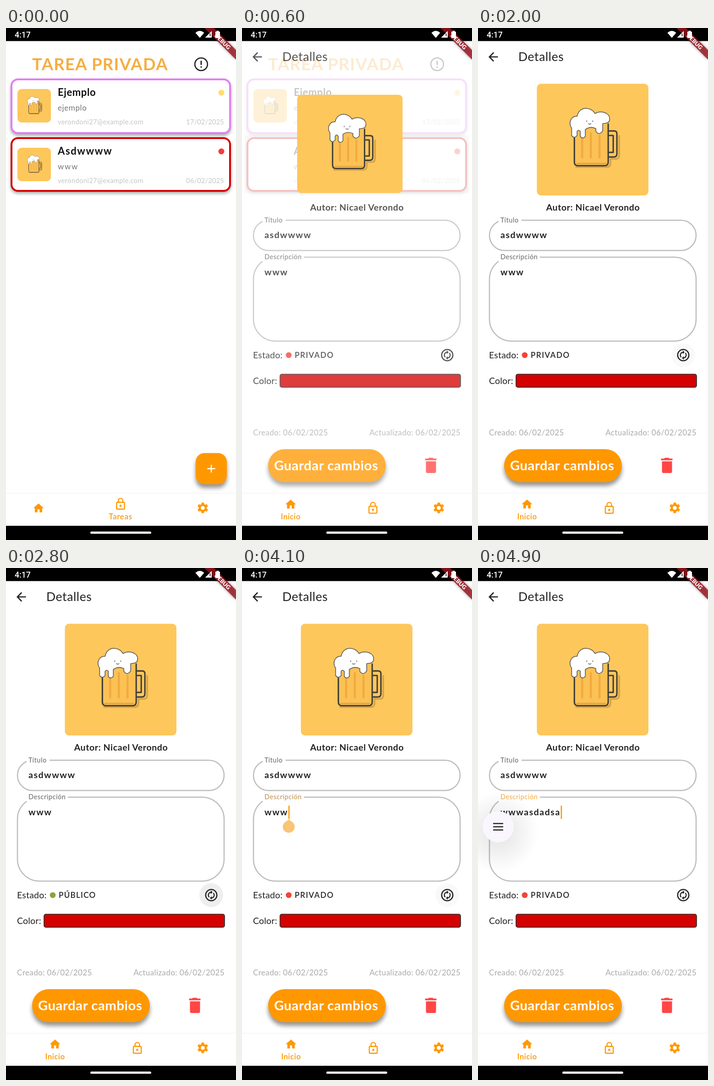
These frames come from a looping animation (502x1116 px, 5000 ms). An HTML page:

```html
<!DOCTYPE html>
<html lang="es">
<head>
<meta charset="utf-8">
<title>Tareas</title>
<style>
html, body { margin: 0; width: 100%; height: 100%; overflow: hidden; background: #fff; }
svg { display: block; }
#stage { width: 100vw; height: 100vh; }
text { font-family: Lato, sans-serif; letter-spacing: .6px; fill: #222; white-space: pre; }
.b { font-weight: 700; }
.s { font-weight: 600; }
.end { text-anchor: end; }
.mid { text-anchor: middle; }
.wide { letter-spacing: 1.5px; }
.heading { font-size: 36.5px; font-weight: 700; letter-spacing: 1.3px; fill: #f5ae42; }
.name { font-size: 22px; font-weight: 700; fill: #111; }
.note { font-size: 17px; fill: #777; }
.small { font-size: 14.6px; letter-spacing: .4px; fill: #c4c4c4; }
.date { letter-spacing: .2px; }
.label { font-size: 14.6px; letter-spacing: .5px; fill: #666; }
.body { font-size: 19.5px; }
.tight { letter-spacing: .2px; }
.stamp { font-size: 17px; letter-spacing: .4px; fill: #aaa; }
.tab { font-size: 17px; font-weight: 600; fill: #ff9800; }
.line { fill: none; stroke: #222; stroke-width: 2.6; }
.field { fill: none; stroke: #bdbdbd; stroke-width: 2.5; }
.card { fill: #fff; stroke-width: 4; filter: drop-shadow(0 4px 3px rgba(0,0,0,.32)); }
.raised { filter: drop-shadow(0 8px 5px rgba(0,0,0,.42)); }
.banner { fill: rgba(160,20,32,.8); filter: drop-shadow(0 0 3px rgba(0,0,0,.5)); }
.orange { fill: #ff9800; }
.yellow { fill: #fdc75b; }
</style>
</head>
<body>
<svg id="stage" viewBox="0 0 502 1116" preserveAspectRatio="none">
  <defs>
    <symbol id="mug" viewBox="0 0 244 244" preserveAspectRatio="xMidYMid slice">
      <g stroke-linejoin="round" stroke-linecap="round">
        <path d="M86 182h66q9 0 9-9v-9h12q7 0 7-7v-43" fill="none" stroke="#b98a3c" stroke-opacity=".55" stroke-width="4"/>
        <path d="M158 103h11q6 0 6 6v44q0 7-7 7h-10M158 113h9v37h-9" fill="none" stroke="#454038" stroke-width="3.2"/>
        <path d="M82 104V171q0 8 8 8h58q8 0 8-8V88" fill="#fbc155" stroke="#454038" stroke-width="3.2"/>
        <path d="M87 174h64" stroke="#d89c3c" stroke-width="2"/>
        <path d="M99 116v45M118 108v53M137 114v47" stroke="#f3aa3c" stroke-width="4.5"/>
        <path d="M76 97C68 85 75 70 88 71C92 49 118 49 127 65C141 57 161 64 159 78Q159 87 144 87V103Q136 114 129 104V98Q117 92 106 100V115Q100 122 95 115V104Q91 99 88 104V113Q81 121 76 113Z" fill="#fff" stroke="#6b6459" stroke-width="1.8"/>
        <path d="M109 81v1.500M122 81v1.500M113 87q3 3 5 0" fill="none" stroke="#999" stroke-width="2.4"/>
      </g>
    </symbol>
    <path id="home" d="M-2 8.5v-6h4v6h5v-8h3L0-8.5-10 .5h3v8z" transform="scale(1.15)"/>
    <g id="lock" fill="none" stroke="#ff9800" stroke-width="2.4">
      <rect x="-8.6" y="-3.2" width="17.2" height="15" rx="1.5"/>
      <path d="M-4.9-3.5V-7a4.9 4.9 0 0 1 9.8 0v3.5"/>
      <circle cy="4.4" r="2.4" fill="#ff9800" stroke="none"/>
    </g>
    <radialGradient id="halo">
      <stop offset=".3" stop-opacity=".08"/>
      <stop offset="1" stop-opacity="0"/>
    </radialGradient>
  </defs>

  <rect width="502" height="1116" fill="#fff"/>
  <g id="list">
    <text class="heading" x="57" y="92">TAREA PRIVADA</text>
    <g class="line">
      <circle cx="426" cy="79" r="13.8"/>
      <path d="M426 71.5v9M426 83.6v3" stroke-width="3"/>
    </g>
    <rect id="press" x="6" y="234" width="489" height="126"/>
    <g id="cards"></g>
  </g>

  <g id="detail">
    <rect y="28" width="502" height="987" fill="#fff"/>
    <path class="line" d="M43.5 63H26M34.2 53.5 24.8 63l9.4 9.5"/>
    <text x="88" y="71.5" font-size="26.5">Detalles</text>
    <text class="body b mid" x="251" y="398">Autor: Nicael Verondo</text>

    <rect class="field" x="25" y="419" width="451" height="66" rx="33"/>
    <rect x="45" y="411" width="50" height="17" fill="#fff"/>
    <text class="label" x="49" y="424">Título</text>
    <text class="body b wide" x="49" y="458">asdwwww</text>

    <rect class="field" x="25" y="499.5" width="451" height="183" rx="48"/>
    <rect x="45" y="491" width="90" height="20" fill="#fff"/>
    <text class="label" id="descLabel" x="49" y="504">Descripción</text>
    <text class="body b wide" id="desc" x="49" y="538.5">www</text>
    <rect class="orange" id="caret" y="518" width="2.6" height="29"/>
    <path id="handle" d="M102 548l9.3 7a13 13 0 1 1-18.6 0z" fill="#f4a632"/>

    <text class="body tight" x="24" y="719.5">Estado:</text>
    <circle id="dot" cx="102" cy="713" r="6.3"/>
    <text class="s wide" id="state" x="115" y="719" font-size="17"></text>
    <circle id="ripple" cx="448" cy="713" r="26"/>
    <g class="line" transform="translate(448 713)">
      <circle r="12.2"/>
      <path d="M-4.5 4.5A6.3 6.3 0 0 1-1-6.2M4.5-4.5A6.3 6.3 0 0 1 1 6.2" stroke-width="2.2"/>
      <path d="M-1-10v7.6l4-3.8zM1 10V2.4l-4 3.8z" fill="#222" stroke="none"/>
    </g>
    <text class="body tight" x="24" y="776">Color:</text>
    <rect x="83" y="754.7" width="394" height="28.3" rx="4" fill="#d50000" stroke="#333" stroke-width="1.8"/>

    <text class="stamp" x="24" y="887.5">Creado: 06/02/2025</text>
    <text class="stamp end" x="477" y="887.5">Actualizado: 06/02/2025</text>
    <rect class="orange raised" x="57" y="918" width="257" height="72" rx="36"/>
    <text class="b" x="70" y="963.5" font-size="29.2" style="fill:#fff">Guardar cambios</text>
    <path d="M399.500 938.500h6.500l2-1.700h8l2 1.700h6.500v3.700h-25zM401.500 944.500h22v22q0 3.500-3.500 3.500h-15q-3.500 0-3.500-3.500z" fill="#ff4646"/>
  </g>

  <g id="hero">
    <rect class="yellow" id="heroBack" rx="9"/>
    <use id="heroMug" href="#mug"/>
  </g>

  <g id="fab">
    <rect class="orange raised" x="-34" y="-34" width="68" height="68" rx="19"/>
    <path d="M-8.5 0h17M0-8.5v17" stroke="#fff" stroke-width="2.4"/>
  </g>

  <rect y="1014" width="502" height="71" fill="#fff"/>
  <rect y="1013" width="502" height="2" fill="#f7f7f7"/>
  <g class="orange">
    <use id="homeIcon" href="#home"/>
    <use id="lockIcon" href="#lock"/>
    <g transform="translate(429.5 1046) rotate(30)" fill="none" stroke="#ff9800">
      <circle r="6.6" stroke-width="4.6"/>
      <circle r="9.9" stroke-width="3.6" pathLength="60" stroke-dasharray="5.4 4.6" stroke-dashoffset="2.7"/>
    </g>
  </g>
  <text class="tab mid" id="homeText" style="letter-spacing:.4px">Inicio</text>
  <text class="tab mid" id="lockText">Tareas</text>

  <g id="menu">
    <circle cx="44" cy="576" r="88" fill="url(#halo)"/>
    <circle cx="44" cy="564" r="34" fill="#f9f7fd"/>
    <path class="line" d="M33 557h22M33 564h22M33 571h22"/>
  </g>

  <rect width="502" height="28.5"/>
  <rect y="1085" width="502" height="31"/>
  <rect x="184" y="1097.5" width="133" height="5" rx="2.5" fill="#eee"/>
  <path class="banner" d="M433 0h21l48 48v21z"/>
  <g fill="#fff">
    <path d="M413.5 10.5q9.5-8.5 19 0L423 21.5zM434.5 21 449 6.5V21zM457 8h2.5V6h5v2h2.5v14h-10z"/>
    <path d="M445.5 12v6" stroke="#000" stroke-width="1.5"/>
  </g>
  <text class="mid" transform="translate(472.7 29.3) rotate(45)" y="4.5" style="font-size:12.4px;font-weight:900;fill:#fff;letter-spacing:0">DEBUG</text>
  <text x="19" y="20.5" style="font:500 17.6px Roboto,sans-serif;fill:#fff;letter-spacing:0">4:17</text>
</svg>
<script>
const LOOP = 5000, STEP = 100;
const $ = id => document.getElementById(id);
const set = (id, attrs) => {
  for (const key in attrs) $(id).setAttribute(key, attrs[key]);
};
const mix = (a, b, p) => a + (b - a) * p;

// Each track is a list of [time, value], linear in between.
const tracks = {
  press:  [[0, 0], [300, .1], [600, .1], [700, 0]],
  page:   [[300, 0], [400, .05], [500, .4], [600, .76], [700, 1]],
  hero:   [[300, 0], [400, .08], [500, .5], [600, .88], [700, 1]],
  fab:    [[300, 1], [400, .75], [500, .24], [600, 0]],
  nav:    [[300, 0], [400, .45], [500, .85], [600, .98], [700, 1]],
  ripple: [[1900, 0], [2000, .35], [2100, 1], [2300, 1], [2600, 0], [2700, 0], [2800, 1], [3000, 1], [3200, 0],
           [3300, 0], [3400, .6], [3500, 1], [3900, 1], [4100, .35], [4200, 0]],
  focus:  [[4000, 0], [4100, .6], [4200, 1]],
  menu:   [[4200, 0], [4500, 1]]
};
const toggles = [2200, 2900, 3500, 3800];
const typed = 'asdadsa', typeStart = 4400, keyTime = 70;

function at(name, t) {
  const track = tracks[name];
  const i = track.findIndex(k => k[0] > t);
  if (i < 0) return track[track.length - 1][1];
  if (i === 0) return track[0][1];
  const [t0, a] = track[i - 1], [t1, b] = track[i];
  return mix(a, b, (t - t0) / (t1 - t0));
}

function card(y, h, border, dot, title, note, date, spacing, id) {
  return `<rect class="card" x="12" y="${y}" width="477" height="${h}" rx="14" stroke="${border}"/>
    <g id="${id}"><rect class="yellow" x="25" y="${y + 21}" width="73" height="73" rx="9"/>
    <use href="#mug" x="25" y="${y + 21}" width="73" height="73"/></g>
    <text class="name" x="113" y="${y + 36}" style="letter-spacing:${spacing}px">${title}</text>
    <text class="note" x="113" y="${y + 68}" style="letter-spacing:${spacing}px">${note}</text>
    <text class="small" x="113" y="${y + 97.5}">verondoni27@example.com</text>
    <text class="small date end" x="476" y="${y + 97.5}">${date}</text>
    <circle cx="470" cy="${y + 29}" r="6.5" fill="${dot}"/>`;
}
$('cards').innerHTML =
  card(112, 117, '#e07ff2', '#ffdc73', 'Ejemplo', 'ejemplo', '17/02/2025', .6, 'thumb1') +
  card(240, 115, '#d50000', '#f93a3a', 'Asdwwww', 'www', '06/02/2025', 1.6, 'thumb2');

function drawHero(p) {
  // The image flies on an arc: sideways first, upwards later.
  const px = p ** .64, py = p ** 1.47;
  const box = {
    x: mix(25, 128.5, px), y: mix(261, 121.5, py),
    width: mix(73, 243.5, px), height: mix(73, 243.5, py)
  };
  set('heroBack', box);
  set('heroMug', box);
  set('hero', { opacity: p > 0 ? 1 : 0 });
  set('thumb2', { opacity: p > 0 ? 0 : 1 });
}

function drawNav(n) {
  const homeX = mix(71, 107, n), lockX = mix(250, 286.5, n);
  set('homeIcon', { transform: `translate(${homeX} ${mix(1046, 1037.5, n)})` });
  set('lockIcon', { transform: `translate(${lockX} ${mix(1037, 1046, n)})` });
  set('homeText', { x: homeX, y: mix(1079, 1070.5, n), opacity: n });
  set('lockText', { x: lockX, y: mix(1070.5, 1079, n), opacity: 1 - n });
}

function drawForm(t) {
  const open = toggles.filter(time => t >= time).length % 2;
  $('state').textContent = open ? 'PÚBLICO' : 'PRIVADO';
  $('state').style.letterSpacing = open ? '1.3px' : '1.5px';
  set('dot', { fill: open ? '#8fa23c' : '#f44336' });
  set('ripple', { 'fill-opacity': at('ripple', t) * .065 });

  const focus = at('focus', t);
  const keys = Math.max(0, Math.floor((t - typeStart) / keyTime));
  $('desc').textContent = 'www' + typed.slice(0, keys);
  $('descLabel').style.fill = `rgb(${mix(102, 244, focus)},${mix(102, 172, focus)},${mix(102, 66, focus)})`;
  set('caret', { x: 49 + $('desc').getComputedTextLength() + .8, opacity: focus > 0 ? 1 : 0 });
  set('handle', { opacity: keys ? 0 : Math.min(1, focus * 1.1) });
}

function draw(t) {
  set('press', { 'fill-opacity': at('press', t) });
  set('detail', { opacity: at('page', t) });
  set('fab', { transform: `translate(448 960.5) scale(${at('fab', t)})` });
  set('menu', { opacity: at('menu', t) });
  drawHero(at('hero', t));
  drawNav(at('nav', t));
  drawForm(t);
}

function tick() {
  const now = (performance.now() + 20) % LOOP;
  draw(Math.floor(now / STEP) * STEP);
  requestAnimationFrame(tick);
}
tick();
</script>
</body>
</html>
```
